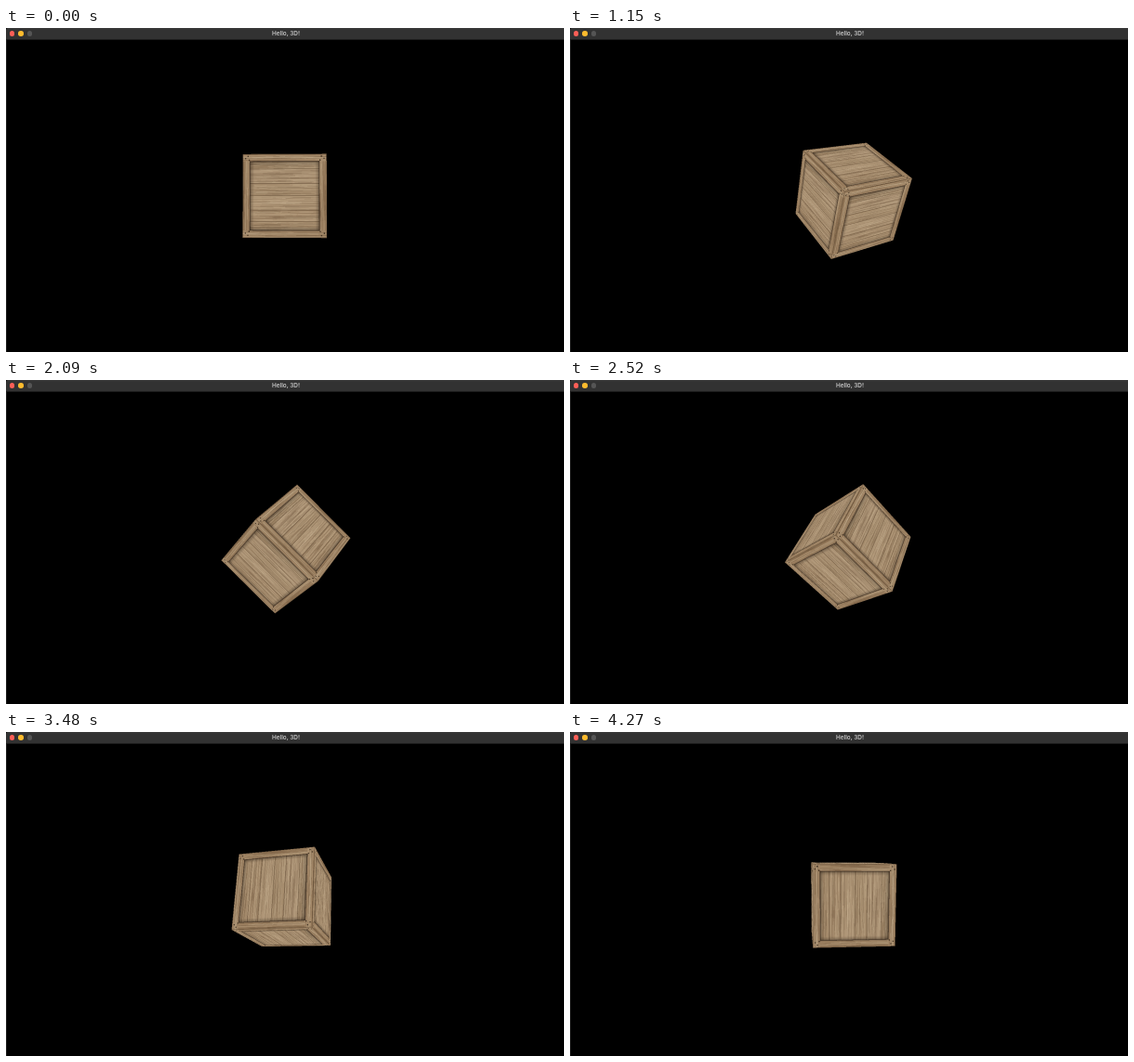
An HTML page with a canvas for the animation above (4.3 s loop, 600 by 349 pixels).

```html
<!DOCTYPE html>
<html lang="en">
<head>
<meta charset="utf-8">
<title>Hello, 3D!</title>
<style>
html, body { margin: 0; width: 100%; height: 100%; overflow: hidden; background: #000; }
canvas { position: absolute; left: 0; top: 0; display: block; }
#bar { position: absolute; left: 0; top: 0; width: 600px; height: 12px; border-bottom: 1px solid #1c1c1c;
  background: linear-gradient(#3a3a3a, #323232 2px); border-top-left-radius: 2px; }
#bar b { position: absolute; left: 1px; width: 600px; top: 0; text-align: center;
  font: 600 6.4px/12px Inter, "Liberation Sans", sans-serif; color: #c6c6c6; }
#bar i { position: absolute; top: 3.2px; width: 5.6px; height: 5.6px; border-radius: 50%; }
</style>
</head>
<body>
<canvas id="stage" width="600" height="349"></canvas>
<div id="bar">
  <i style="left:3.9px;background:#fe5f57"></i>
  <i style="left:13.2px;background:#febb2e"></i>
  <i style="left:22.6px;background:#555"></i>
  <b>Hello, 3D!</b>
</div>
<script>
const LOOP = 4300, FRAMES = 142;
const CX = 301.1, CY = 182.2, DIST = 5, FOCAL = 407;
const SPEED = Math.PI / 4, PHASE = -2.7 * Math.PI / 180;
const BOX = { x: 224, y: 104, w: 152, h: 152 };
const SUB = 3, TEX = 256;

let seed = 11;
function rnd() {
  seed = (seed * 1664525 + 1013904223) >>> 0;
  return seed / 4294967296;
}

// One board with its grain along the x axis of the given context.
function board(g, x, y, w, h, base, streaks) {
  g.save();
  g.beginPath();
  g.rect(x, y, w, h);
  g.clip();
  g.fillStyle = base;
  g.fillRect(x, y, w, h);
  for (let i = 0; i < streaks; i++) {
    const len = w * (0.15 + rnd() * 0.8);
    const sx = x - len / 2 + rnd() * w, sy = y + rnd() * h;
    const light = rnd() < 0.5;
    g.strokeStyle = light ? "rgba(206,186,156,0.25)" : "rgba(98,74,50,0.22)";
    g.lineWidth = 0.6 + rnd() * 1.9;
    g.beginPath();
    g.moveTo(sx, sy);
    g.quadraticCurveTo(sx + len / 2, sy + (rnd() - 0.5) * 8, sx + len, sy + (rnd() - 0.5) * 3);
    g.stroke();
  }
  g.restore();
}

function shade(g, x0, y0, x1, y1, box) {
  const grad = g.createLinearGradient(x0, y0, x1, y1);
  grad.addColorStop(0, "rgba(35,26,18,0.6)");
  grad.addColorStop(0.3, "rgba(40,30,20,0.28)");
  grad.addColorStop(1, "rgba(40,30,20,0)");
  g.fillStyle = grad;
  g.fillRect(...box);
}

function makeTexture() {
  const c = document.createElement("canvas");
  c.width = c.height = TEX;
  const g = c.getContext("2d", { willReadFrequently: true });
  const B = 22, IN = TEX - 2 * B, E = TEX - B;

  const seams = [B, 46, 90, 128, 171, 206, E];
  const tones = ["#a2896a", "#ab9274", "#a68d6e", "#ae9576", "#a68c6d", "#a3896a"];
  tones.forEach((tone, i) => {
    const y = seams[i], h = seams[i + 1] - y;
    board(g, B, y, IN, h, tone, 60);
    g.fillStyle = "rgba(75,54,34,0.45)";
    if (i) g.fillRect(B, y - 1, IN, 2.2);
  });

  shade(g, 0, B, 0, B + 15, [B, B, IN, 15]);
  shade(g, 0, E, 0, E - 12, [B, E - 12, IN, 12]);
  shade(g, B, 0, B + 13, 0, [B, B, 13, IN]);
  shade(g, E, 0, E - 13, 0, [E - 13, B, 13, IN]);

  for (const x of [0, E]) {
    g.save();
    g.translate(x, TEX);
    g.rotate(-Math.PI / 2);
    board(g, 0, 0, TEX, B, "#9c8060", 48);
    g.restore();
  }
  for (const y of [0, E]) board(g, 0, y, TEX, B, "#9f8363", 48);

  g.strokeStyle = "rgba(48,34,22,0.55)";
  g.lineWidth = 2.2;
  g.strokeRect(B, B, IN, IN);
  g.strokeStyle = "rgba(60,44,28,0.35)";
  g.lineWidth = 2;
  g.strokeRect(1, 1, TEX - 2, TEX - 2);

  g.fillStyle = "rgba(40,28,18,0.75)";
  for (const fx of [0, 1]) for (const fy of [0, 1]) {
    for (const [x, y] of [[8, 14], [16, 7], [20, 19]]) {
      g.beginPath();
      g.arc(fx ? TEX - x : x, fy ? TEX - y : y, 2.2, 0, 7);
      g.fill();
    }
  }
  return g.getImageData(0, 0, TEX, TEX).data;
}

const tex = makeTexture();
const ctx = document.getElementById("stage").getContext("2d");
const img = ctx.createImageData(BOX.w, BOX.h);

function texel(u, v) {
  const x = Math.min(TEX - 1, Math.max(0, (u + 0.5) * TEX | 0));
  const y = Math.min(TEX - 1, Math.max(0, (0.5 - v) * TEX | 0));
  return (y * TEX + x) * 4;
}

// Casts rays at a unit cube turned by angle a about the axis (1, 1, 0).
function drawCube(a) {
  const c = Math.cos(a), s = Math.sin(a) * Math.SQRT1_2;
  const p = (1 + c) / 2, q = (1 - c) / 2;
  const ox = -s * DIST, oy = s * DIST, oz = c * DIST;

  function hit(X, Y) {
    const dx = p * X + q * Y + s * FOCAL;
    const dy = q * X + p * Y - s * FOCAL;
    const dz = s * (X - Y) - c * FOCAL;
    const tx = (-ox - Math.sign(dx) / 2) / dx, fx = (-ox + Math.sign(dx) / 2) / dx;
    const ty = (-oy - Math.sign(dy) / 2) / dy, fy = (-oy + Math.sign(dy) / 2) / dy;
    const tz = (-oz - Math.sign(dz) / 2) / dz, fz = (-oz + Math.sign(dz) / 2) / dz;
    const t = Math.max(dx ? tx : -1e9, dy ? ty : -1e9, dz ? tz : -1e9);
    const far = Math.min(dx ? fx : 1e9, dy ? fy : 1e9, dz ? fz : 1e9);
    if (t > far) return -1;
    const x = ox + dx * t, y = oy + dy * t, z = oz + dz * t;
    if (t === tx) return texel(z, y);
    if (t === ty) return texel(x, -z);
    return texel(x, y);
  }

  const d = img.data, n = SUB * SUB;
  for (let j = 0, k = 0; j < BOX.h; j++) {
    for (let i = 0; i < BOX.w; i++, k += 4) {
      let r = 0, g = 0, b = 0;
      for (let m = 0; m < n; m++) {
        const X = BOX.x + i + (m % SUB + 0.5) / SUB - CX;
        const Y = CY - BOX.y - j - ((m / SUB | 0) + 0.5) / SUB;
        const h = hit(X, Y);
        if (h >= 0) { r += tex[h]; g += tex[h + 1]; b += tex[h + 2]; }
      }
      d[k] = r / n;
      d[k + 1] = g / n;
      d[k + 2] = b / n;
      d[k + 3] = 255;
    }
  }
  ctx.putImageData(img, BOX.x, BOX.y);
}

// Steps last 30 ms, every 36th one 40 ms.
const start = n => 30 * n + 10 * Math.floor((n + 28) / 36);

function stepAt(t) {
  let n = Math.min(FRAMES - 1, Math.floor(t / 30));
  while (n && start(n) > t) n--;
  return n;
}

ctx.fillStyle = "#000";
ctx.fillRect(0, 0, 600, 349);
ctx.fillStyle = "#1e1e1e";
ctx.fillRect(0, 12, 1, 337);
let shown = -1;
const t0 = performance.now();

function tick() {
  const n = stepAt((performance.now() - t0) % LOOP);
  if (n !== shown) {
    drawCube(PHASE + n * LOOP / FRAMES / 1000 * SPEED);
    shown = n;
  }
  requestAnimationFrame(tick);
}
tick();
</script>
</body>
</html>
```
